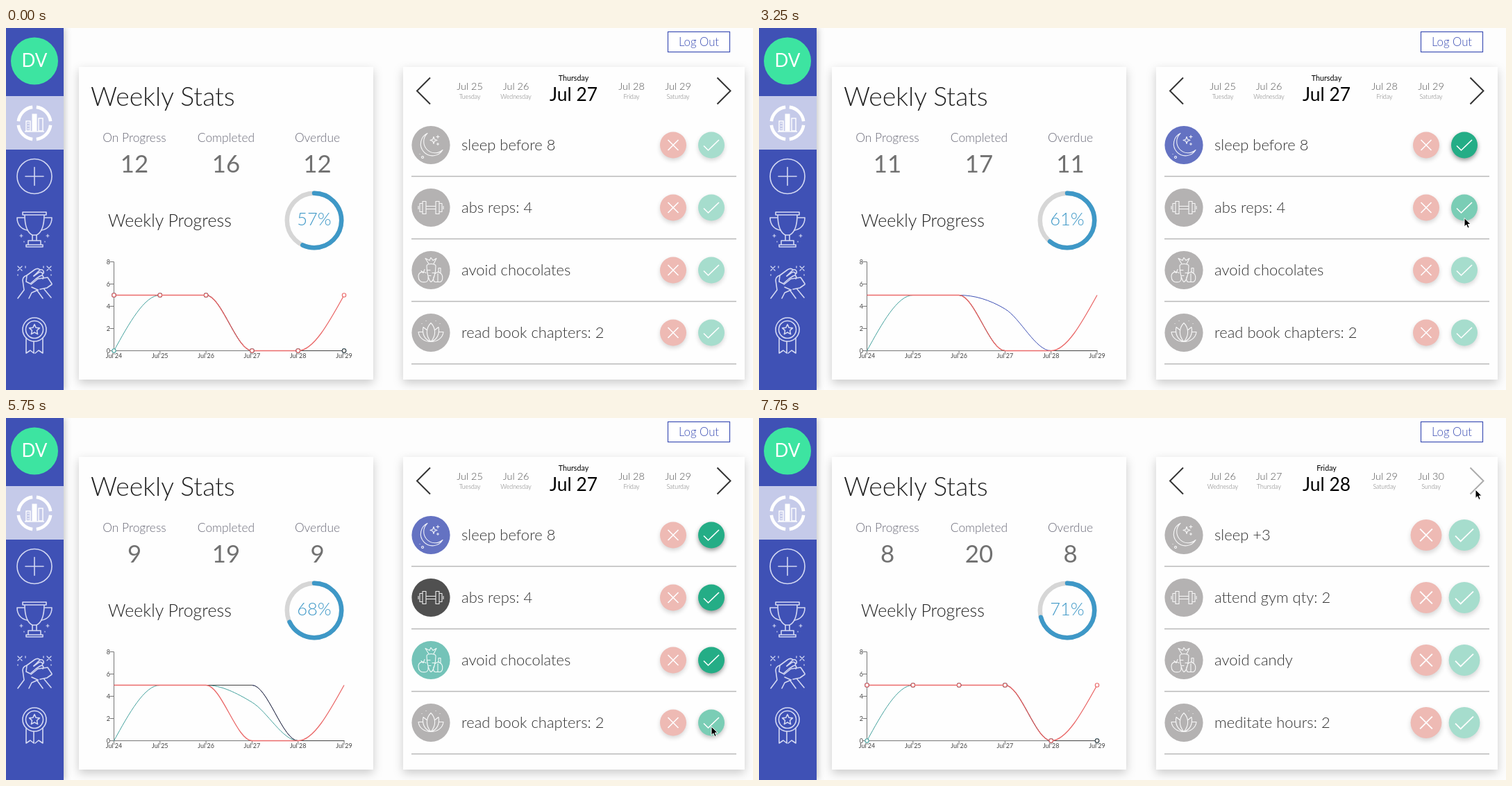
Animation of 1076x521 px, one loop 8000 ms. Source, as an HTML page:

```html
<!DOCTYPE html>
<html lang="en">
<head>
<meta charset="utf-8">
<title>Weekly Stats</title>
<style>
html, body { margin: 0; width: 100%; height: 100%; overflow: hidden; background: #fdfdfd; }
svg { display: block; width: 100vw; height: 100vh; font-family: Lato, "Open Sans", sans-serif; font-weight: 300; }
.mid { text-anchor: middle; }
.card { fill: #fefefe; filter: drop-shadow(0 5px 7px rgba(0,0,0,.2)); }
.nav { fill: none; stroke: #d3d8f2; stroke-width: 1.6; stroke-linejoin: round; stroke-linecap: round; }
.label { font-size: 17.4px; fill: #6a6a78; }
.count { font-size: 34.8px; font-weight: 400; fill: #717171; }
.day { font-size: 14.5px; fill: #555; }
.weekday { font-size: 8.8px; fill: #777; }
.task { font-size: 22px; fill: #333; }
.axis { font-size: 9px; font-weight: 400; fill: #444; }
.icon { fill: none; stroke: #fff; stroke-width: 1.1; stroke-linejoin: round; stroke-linecap: round; opacity: .9; }
.btn path { fill: none; stroke: #fff; stroke-width: 1.6; }
.btn circle { filter: drop-shadow(0 3px 3px rgba(0,0,0,.4)); }
.line { fill: none; }
.dot { fill: #fff; stroke-width: 1.1; }
.chev { fill: none; stroke: #333; stroke-width: 2; }
</style>
</head>
<body>
<svg id="stage" viewBox="0 0 1076 521" preserveAspectRatio="none">
  <rect width="83" height="521" fill="#3f51b5" style="filter:drop-shadow(2px 0 5px rgba(0,0,0,.22))"/>
  <rect y="98" width="83" height="77" fill="#c5cae9"/>
  <circle cx="41" cy="47.5" r="34" fill="#3de4a1"/>
  <text class="mid" x="41" y="56" font-size="26" font-weight="400" fill="#fff">DV</text>

  <g transform="translate(41 137)" fill="none" stroke="#fff">
    <circle r="23.3" stroke-width="4.6" pathLength="100" stroke-dasharray="21 4" stroke-dashoffset="-2"/>
    <rect x="-12" y="-3" width="6" height="14" stroke-width="1.4"/>
    <path d="M-10 0h3M-10 4h3M-10 8h3" stroke-width="1.4" stroke-dasharray="1.5 1"/>
    <rect x="-3" y="-13" width="6" height="24" fill="#fff"/>
    <rect x="6" y="-7" width="6" height="18" stroke-width="1.4"/>
    <path d="M-14 12h28" stroke-width="1.4"/>
  </g>
  <g class="nav" transform="translate(41 213.5)">
    <circle r="25"/><path d="M-13 0h26M0-13v26"/>
  </g>
  <g class="nav" transform="translate(41 290)">
    <path d="M-17-25h34v4h-34zM-14-21C-14-4-9 5-3 8h6C9 5 14-4 14-21"/>
    <path d="M-15-17h-10C-25-6-18 0-10 1M15-17h10C25-6 18 0 10 1"/>
    <path d="M-3 8v8h6V8M-9 16h18v6H-9zM-12 22h24v3h-24z"/>
    <path d="M-19 7v4M-21 9h4M19 7v4M17 9h4M-15 17v1M15 17v1" stroke-width="1.2"/>
  </g>
  <g class="nav" transform="translate(41 366)">
    <path d="M-24 23l9-12-2-14c0-4 3-6 6-7L0-18c3-2 6-2 8 0l-9 9M-8 23l4-8 9-4"/>
    <path d="M8-18c4-1 6 2 5 5M-1-9L6-14c4-2 7 1 5 4M2-5l6-4c4-2 6 1 4 4M-11-10l-1 9 6 3 8-7"/>
    <path d="M-5 3l10-8 14-2 6 9M5 11l-9-4M8 10l10-2 7-5M14 10l10 12M4 12l8 11"/>
    <path d="M-24-23l6 6M-18-23l-6 6M18-23l6 6M24-23l-6 6M-13-23v2M13-23v2M-24-11v1M24-11v1" stroke-width="1.3"/>
  </g>
  <g class="nav" transform="translate(41 434)">
    <circle r="17"/><circle r="12.5"/>
    <path d="M0-7.5l2.2 4.8 5.2.6-3.9 3.5 1.1 5.2L0 4l-4.6 2.6 1.1-5.2-3.9-3.5 5.2-.6z"/>
    <path d="M-12 12v22l6-4 5 4V17M12 12v22l-6-4-5 4"/>
  </g>

  <rect x="953.5" y="5.5" width="89" height="29" fill="#fff" stroke="#3f51b5" stroke-width="1.2"/>
  <text class="mid" x="998" y="26" font-size="16.8" fill="#3f51b5">Log Out</text>

  <rect class="card" x="105" y="56" width="424" height="450"/>
  <rect class="card" x="572" y="56" width="492" height="450"/>

  <text x="122" y="112" font-size="37.4" fill="#222">Weekly Stats</text>
  <g class="mid label">
    <text x="185" y="164">On Progress</text><text x="317" y="164">Completed</text><text x="448.5" y="164">Overdue</text>
  </g>
  <g class="mid count">
    <text id="open" x="185" y="208"/><text id="done" x="317" y="208"/><text id="late" x="448.5" y="208"/>
  </g>
  <text x="147" y="286" font-size="25" fill="#222">Weekly Progress</text>
  <g fill="none" stroke-width="6.5">
    <circle cx="444" cy="277" r="39.2" stroke="#d6d6d6"/>
    <circle id="ring" cx="444" cy="277" r="39.2" stroke="#3e98c7" stroke-linecap="round" pathLength="100" transform="rotate(-90 444 277)"/>
  </g>
  <text id="pct" class="mid" x="444" y="284" font-size="25.5" fill="#3e98c7"/>
  <g id="axes" transform="translate(.5 0)"></g>
  <g id="chart" transform="translate(.5 0)"></g>

  <path class="chev" d="M611 71.5L592 90.5L611 109.5"/>
  <path id="next" class="chev" d="M1024.5 71.5L1043.5 90.5L1024.5 109.5"/>
  <g id="days"></g>
  <g id="rows"></g>
  <path id="mouse" d="M0 0v12.5l2.9-2.7 2 4.7 2.3-1-2-4.5h4z" fill="#000" stroke="#fff" stroke-width="1"/>
</svg>
<script>
const NS = 'http://www.w3.org/2000/svg';
const $ = id => document.getElementById(id);
function add(parent, tag, attrs = {}, text = '') {
  const el = document.createElementNS(NS, tag);
  for (const k in attrs) el.setAttribute(k, attrs[k]);
  el.textContent = text;
  return parent.appendChild(el);
}

const LOOP = 8000, TICK = 250, NEXT_DAY = 7500, MORPH = 1500;
const CLICKS = [2570, 3537, 5140, 5990];
const ROW_Y = [168.5, 258.5, 348.5, 438.5];
const GREY = '#b4b2b2', COLORS = ['#6472c2', '#505050', '#74c3b8', '#f58f8d'];
const TASKS = [
  ['sleep before 8', 'abs reps: 4', 'avoid chocolates', 'read book chapters: 2'],
  ['sleep +3', 'attend gym qty: 2', 'avoid candy', 'meditate hours: 2']
];
const WEEK = ['Sunday', 'Monday', 'Tuesday', 'Wednesday', 'Thursday', 'Friday', 'Saturday'];
const ICONS = [
  'M-5-17A17 17 0 1 0 17 7A16 16 0 0 1-5-17M4-12l1.3 3.7L9-7 5.3-5.7 4-2 2.7-5.7-1-7 2.7-8.3zM10-14v4M8-12h4M10-3v3M8.5-1.5h3M-16 13h.1M-12 16a1.5 1.5 0 1 0 .1 0',
  'M-7-2H7V2H-7zM-12-9h5V9h-5zM12-9H7V9h5zM-16-6h4V6h-4zM16-6h-4V6h4zM-18-2v4M18-2v4',
  'M-6-6C-6-10 7-10 7-6C7 3 4 16 0 17C-3 15-6 3-6-6M-3-9l-5-8 6 3 2-4 3 4 5-3-4 8M-5 0h4M2 4h3M-3 8h3M-7 4C-12 1-18 3-18 9C-18 15-14 18-10 17C-6 18-3 15-4 10M-11 4l2-5M-14 1l3 3M6 5C8 3 11 2 13 4C18 6 18 16 13 17H6C3 16 3 11 5 8M11 3V-3h3v7M10 5v12',
  'M0-14C7-7 8 4 0 13C-8 4-7-7 0-14M-6-4L-11-8C-13 2-9 10 0 13C9 10 13 2 11-8L6-4M-12-1L-18-1C-17 8-9 13 0 13C9 13 17 8 18-1L12-1M-13-13h.1M13-13h.1M-7-17h.1M7-17h.1'
];

const rows = ROW_Y.map((y, i) => {
  const g = add($('rows'), 'g', { transform: `translate(0 ${y})` });
  add(g, 'path', { d: 'M584 45H1052', stroke: '#b8b8b8', 'stroke-width': 1.3 });
  const disc = add(g, 'circle', { cx: 612, r: 27.6 });
  add(g, 'path', { class: 'icon', d: ICONS[i], transform: 'translate(612 0)' });
  const name = add(g, 'text', { class: 'task', x: 656, y: 7 });
  const button = (x, fill, d) => {
    const b = add(g, 'g', { class: 'btn' });
    add(b, 'circle', { r: 19, fill });
    add(b, 'path', { d });
    return { el: b, x, y };
  };
  return { disc, name,
    no: button(961, '#d75548', 'M-7.5-7.5L7.5 7.5M7.5-7.5L-7.5 7.5'),
    yes: button(1016, '#24ad86', 'M-11 1L-4.5 7.5L11-7.5') };
});

const days = [668, 734.5, 817.5, 901, 968].map((x, i) => {
  const now = i === 2;
  return {
    date: add($('days'), 'text', { class: 'mid day', x, y: now ? 105 : 89,
      style: now ? 'font-size:26.4px;font-weight:400;fill:#000' : '' }),
    name: add($('days'), 'text', { class: 'mid weekday', x, y: now ? 76 : 102,
      style: now ? 'font-size:10.7px;font-weight:400;fill:#000' : '' })
  };
});

// Chart
const STEP = 66.3, px = i => 155 + STEP * i, py = v => 464.5 - 16 * v;
add($('axes'), 'path', { d: `M155 ${py(8)}V${py(0)}H487`, fill: 'none', stroke: '#777' });
for (let v = 0; v <= 8; v += 2) {
  add($('axes'), 'path', { d: `M149 ${py(v)}h6`, stroke: '#777' });
  add($('axes'), 'text', { class: 'axis', x: 149.5, y: py(v) + 3, 'text-anchor': 'end' }, v);
}
for (let i = 0; i < 6; i++) {
  add($('axes'), 'path', { d: `M${px(i)} 464v6`, stroke: '#777' });
  add($('axes'), 'text', { class: 'axis mid', x: px(i), y: 475 }, 'Jul ' + (24 + i));
}
// click: which tick of the checklist lifts this series on Jul 27
const series = [
  { color: '#3f51b5', width: 1, click: 0, data: [5, 5, 5, 0, 0, 0] },
  { color: '#45a29e', width: 1, click: 2, data: [0, 5, 5, 0, 0, 0] },
  { color: '#444', width: 1, click: 1, data: [5, 5, 5, 0, 0, 0] },
  { color: '#ea6a6a', width: 1.3, click: 3, data: [5, 5, 5, 0, 0, 5] }
];
for (const s of series) {
  s.line = add($('chart'), 'path', { class: 'line', stroke: s.color, 'stroke-width': s.width });
}
const dotLayer = add($('chart'), 'g');
for (const s of series) {
  s.dots = s.data.map((v, i) => add(dotLayer, 'circle', { class: 'dot', cx: px(i), r: 2.7, stroke: s.color }));
}

function monotone(v) {
  const n = v.length - 1, d = v.slice(1).map((b, i) => b - v[i]);
  const m = v.map((_, i) => {
    if (i === 0 || i === n) return 0;
    const a = d[i - 1], b = d[i];
    return (Math.sign(a) + Math.sign(b)) * Math.min(Math.abs(a), Math.abs(b), Math.abs(a + b) / 4);
  });
  m[0] = (3 * d[0] - m[1]) / 2;
  m[n] = (3 * d[n - 1] - m[n - 1]) / 2;
  let path = `M${px(0)} ${py(v[0])}`;
  for (let i = 0; i < n; i++) {
    path += `C${px(i + 1 / 3)} ${py(v[i] + m[i] / 3)} ${px(i + 2 / 3)} ${py(v[i + 1] - m[i + 1] / 3)} ${px(i + 1)} ${py(v[i + 1])}`;
  }
  return path;
}

// cubic-bezier(.25, .1, .25, 1)
function ease(x) {
  if (x <= 0) return 0;
  if (x >= 1) return 1;
  const bez = (a, b, u) => 3 * a * u * (1 - u) ** 2 + 3 * b * u * u * (1 - u) + u ** 3;
  let lo = 0, hi = 1;
  for (let i = 0; i < 24; i++) {
    const u = (lo + hi) / 2;
    if (bez(.25, .25, u) < x) lo = u; else hi = u;
  }
  return bez(.1, 1, lo);
}

// Pointer stops: time, x, y
const PATH = [
  [500, 840, 352], [750, 845, 325], [1000, 938, 262], [1250, 1000, 196], [1500, 1010.5, 171],
  [2500, 1011, 172], [2750, 1012, 180], [3000, 1015, 256], [3250, 1016, 273.5], [3500, 1016, 268],
  [3750, 1010, 300], [4000, 964, 346], [4250, 955, 355], [4500, 972, 353], [4750, 1010, 352],
  [5000, 1014, 354], [5250, 1014, 376], [5500, 1016, 432], [5750, 1016, 444], [6000, 1016, 442],
  [6250, 1020, 380], [6500, 1036, 108], [6750, 1037, 104], [7500, 1036, 104], [7750, 1032, 103]
];
function pointer(t) {
  const i = PATH.findIndex(p => p[0] > t);
  if (i === 0) return [-99, -99];
  if (i < 0) return PATH[PATH.length - 1].slice(1);
  const a = PATH[i - 1], b = PATH[i], k = (t - a[0]) / (b[0] - a[0]);
  return [a[1] + (b[1] - a[1]) * k, a[2] + (b[2] - a[2]) * k];
}

function paint(t) {
  const [mx, my] = pointer(t), [hx, hy] = pointer(t - TICK);
  const n = CLICKS.filter(c => t >= c).length;
  const moved = t >= NEXT_DAY, size = t >= NEXT_DAY + TICK ? 1.18 : 1;

  $('mouse').setAttribute('transform', `translate(${mx} ${my})`);
  $('open').textContent = $('late').textContent = 12 - n;
  $('done').textContent = 16 + n;
  const pct = Math.round((16 + n) / 28 * 100);
  $('pct').textContent = pct + '%';
  $('ring').setAttribute('stroke-dasharray', `${pct} 100`);
  $('next').setAttribute('stroke-opacity', hx > 1020 && hy < 115 ? .4 : 1);

  days.forEach((d, i) => {
    const date = 25 + i + moved;
    d.date.textContent = 'Jul ' + date;
    d.name.textContent = WEEK[(date - 23) % 7];
  });

  rows.forEach((r, i) => {
    const on = !moved && i < n;
    r.disc.setAttribute('fill', on ? COLORS[i] : GREY);
    r.name.textContent = TASKS[+moved][i];
    for (const b of [r.no, r.yes]) {
      const hover = Math.hypot(hx - b.x, hy - b.y) < 19 && Math.hypot(mx - b.x, my - b.y) < 19;
      b.el.setAttribute('opacity', on && b === r.yes ? 1 : hover ? .6 : .4);
      b.el.setAttribute('transform', `translate(${b.x} 0) scale(${size})`);
    }
  });

  dotLayer.setAttribute('visibility', n === 0 || moved ? 'visible' : 'hidden');
  for (const s of series) {
    const v = s.data.slice();
    v[3] = moved ? 5 : 5 * ease((t - CLICKS[s.click]) / MORPH);
    s.line.setAttribute('d', monotone(v));
    s.dots.forEach((d, i) => d.setAttribute('cy', py(v[i])));
  }
}

// The screen advances in quarter-second steps, with two rests.
function snap(t) {
  if (t < 500) return 0;
  if (t >= 1500 && t < 2500) return 1500;
  return Math.floor(t / TICK) * TICK;
}
const start = performance.now();
let last = -1;
function frame() {
  const t = snap((performance.now() - start) % LOOP);
  if (t !== last) paint(last = t);
  requestAnimationFrame(frame);
}
frame();
</script>
</body>
</html>
```
